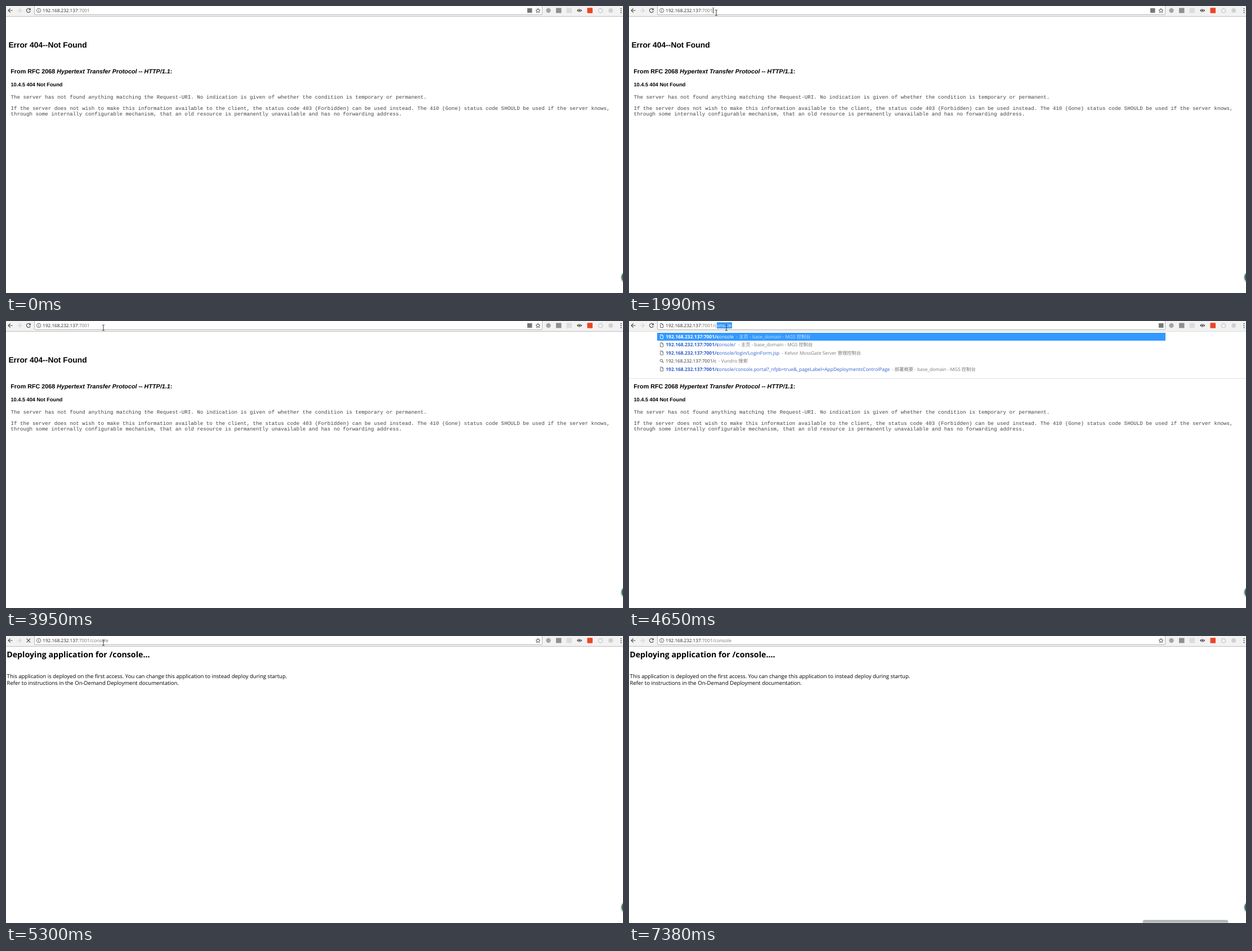
Recreate the animation shown at these times as an HTML page. Size 1096 px wide and 511 px high, loop 8000 ms.

```html
<!DOCTYPE html>
<html lang="en">
<head>
<meta charset="utf-8">
<title>Console deployment</title>
<style>
  html, body { margin: 0; width: 100%; height: 100%; overflow: hidden; background: #fff; }
  svg { display: block; width: 100vw; height: 100vh; }
  text { white-space: pre; text-rendering: geometricPrecision; }
  .ui { font-family: "Open Sans", "Noto Sans", "Noto Sans CJK SC", "Noto Sans CJK JP", sans-serif; }
  .err { font-family: "Liberation Sans", Arial, sans-serif; font-weight: bold; }
  .mono { font-family: "Liberation Mono", "Courier New", monospace; font-size: 9.2px; fill: #444; }
  .line { fill: none; stroke: #4a4a4a; stroke-width: 1.2; }
</style>
</head>
<body>
<svg id="stage" viewBox="0 0 1096 511" preserveAspectRatio="none" xmlns="http://www.w3.org/2000/svg">
  <defs>
    <linearGradient id="tip" x1="0" y1="0" x2="0" y2="1">
      <stop offset="0" stop-color="#a3a8a8"/>
      <stop offset=".5" stop-color="#c6caca"/>
      <stop offset="1" stop-color="#eef0f0"/>
    </linearGradient>
    <g id="doc">
      <path d="M-2.5 -3.5H.7L2.5 -1.6V3.5H-2.5ZM.5 -3.5V-1.4H2.5" fill="none" stroke="currentColor" stroke-width=".9"/>
    </g>
  </defs>
  <rect width="1096" height="511" fill="#fff"/>

  <g id="errorPage">
    <text class="err" x="4.4" y="74" font-size="13.85">Error 404--Not Found</text>
    <text class="err" x="8.3" y="119.8" font-size="10.77">From RFC 2068 <tspan font-style="italic">Hypertext Transfer Protocol -- HTTP/1.1</tspan>:</text>
    <text class="err" x="8.5" y="143" font-size="9.2">10.4.5 404 Not Found</text>
    <text class="mono" x="8.5" y="165">The server has not found anything matching the Request-URI. No indication is given of whether the condition is temporary or permanent.</text>
    <text class="mono" x="8.5" y="184.8">If the server does not wish to make this information available to the client, the status code 403 (Forbidden) can be used instead. The 410 (Gone) status code SHOULD be used if the server knows,</text>
    <text class="mono" x="8.5" y="195">through some internally configurable mechanism, that an old resource is permanently unavailable and has no forwarding address.</text>
  </g>

  <g id="deployPage" class="ui">
    <text id="heading" x="1.2" y="38" font-size="14.23" font-weight="bold"></text>
    <g font-size="9.55">
      <text x="1.6" y="74.8">This application is deployed on the first access. You can change this application to instead deploy during startup.</text>
      <text x="1.6" y="87">Refer to instructions in the On-Demand Deployment documentation.</text>
    </g>
  </g>

  <g id="badge">
    <circle cx="1104" cy="483.5" r="13" fill="#ececec"/>
    <circle cx="1104" cy="483.3" r="11.6" fill="#c6cbc8"/>
    <circle cx="1104" cy="483" r="10.2" fill="#3d7d5b" stroke="#2f5e48" stroke-width=".8"/>
  </g>
  <g id="popup">
    <rect x="911.8" y="-1.2" width="153.400" height="11" rx="4" fill="#e6e8e8"/>
    <rect x="913" width="151" height="9" rx="3" fill="url(#tip)"/>
  </g>

  <g id="toolbar">
    <rect width="1096" height="18" fill="#f2f2f2"/>
    <rect y="18" width="1096" height="1" fill="#bdbdbd"/>
    <path d="M50.5 -2V14Q50.5 15.500 52 15.500H951Q952.500 15.500 952.500 14V-2Z" fill="#fff" stroke="#b4b4b4"/>
    <path class="line" d="M11.500 8H4.200M7.700 4.300L4 8L7.700 11.700"/>
    <path class="line" style="stroke:#cfcfcf" d="M19.500 8H27M23.400 4.300L27.100 8L23.400 11.700"/>
    <g id="reload">
      <path class="line" d="M42.400 5.500A3.500 3.500 0 1 0 43.200 9.200"/>
      <path d="M43.900 3.800V7.500H40.200Z" fill="#4a4a4a"/>
    </g>
    <path id="stop" class="line" d="M36.600 4.700L43.200 11.300M43.200 4.700L36.600 11.300"/>
    <g id="info">
      <circle cx="58.200" cy="8" r="3.700" fill="none" stroke="#555" stroke-width=".9"/>
      <path d="M58.200 7.400V10M58.200 5.600V6.600" stroke="#555"/>
    </g>
    <use id="urlDoc" href="#doc" x="58.200" y="8" color="#555"/>
    <rect id="translate" y="4" width="8.500" height="8" fill="#777"/>
    <path id="star" fill="none" stroke="#444" stroke-width=".9"/>
    <circle cx="963.500" cy="8" r="4.200" fill="#a5a5a5"/>
    <rect x="977" y="3.500" width="9.500" height="9" fill="#8f8f8f"/>
    <rect x="995.500" y="3.500" width="9.500" height="9" fill="#dcdcdc"/>
    <path d="M1014 8Q1018.700 2.500 1023.400 8Q1018.700 13.500 1014 8Z" fill="#444"/>
    <circle cx="1018.700" cy="8" r="1.900" fill="#444" stroke="#f2f2f2" stroke-width=".9"/>
    <rect x="1032.500" y="3.300" width="9.500" height="9.500" rx="1" fill="#ee4323"/>
    <circle cx="1056" cy="8.300" r="3.700" fill="none" stroke="#c3c3c3" stroke-width="1.200"/>
    <circle cx="1074.200" cy="8" r="4" fill="#d0d0d0"/>
    <g fill="#555"><circle cx="1092.500" cy="4.700" r="1"/><circle cx="1092.500" cy="8.200" r="1"/><circle cx="1092.500" cy="11.700" r="1"/></g>
    <rect id="mark" y="2.300" height="11" fill="#3399ff"/>
    <text id="url" class="ui" x="65.300" y="10.900"></text>
    <rect id="caret" x="149" y="2.500" width="1" height="10.500" fill="#222"/>
  </g>

  <g id="menu" class="ui" font-size="8.45"></g>

  <path id="beam" d="M-2 -5Q-.4 -5 0 -4.300Q.4 -5 2 -5M0 -4.300V4.300M-2 5Q-.4 5 0 4.300Q.4 5 2 5" fill="none" stroke="#222" stroke-width=".9"/>
  <path id="arrow" d="M0 0V9.500L2.200 7.500L3.700 11L5.200 10.300L3.700 7H6.700Z" fill="#fff" stroke="#222" stroke-width=".7"/>
</svg>
<script>
const LOOP = 8000;
const HOST = '192.168.232.137', PORT = ':7001';
const $ = id => document.getElementById(id);
const show = (id, on) => $(id).setAttribute('display', on ? 'inline' : 'none');
const set = (id, attrs) => { for (const k in attrs) $(id).setAttribute(k, attrs[k]); };
const write = (id, html) => { const el = $(id); if (el.last !== html) el.innerHTML = el.last = html; };

// [completed part after "c", description, x of the description]
const ROWS = [
  ['onsole', '主页 - base_domain - MGS 控制台', 190.5],
  ['onsole/', '主页 - base_domain - MGS 控制台', 194.2],
  ['onsole/login/LoginForm.jsp', 'Kelvor MossGate Server 管理控制台', 271.5],
  [null, 'Vundro 搜索', 159],
  ['onsole/console.portal?_nfpb=true&amp;_pageLabel=AppDeploymentsControlPage', '部署概要 - base_domain - MGS 控制台', 467]
];

function menuHtml(typed) {
  const rest = typed === '/' ? 'c' : '';
  let html = '<rect y="18.500" width="1096" height="84" fill="#fff"/>' +
    '<rect y="102" width="1096" height="1" fill="#e2e2e2"/>' +
    '<rect x="50" y="21" width="903" height="14" fill="#3399ff"/>';
  ROWS.forEach(([tail, note, x], i) => {
    const y = 28 + i * 14.4, base = y + 3, active = i === 0;
    const ink = active ? '#fff' : tail ? '#2f5fc8' : '#333';
    const icon = tail ? `<use href="#doc" x="58.200" y="${y}" color="${active ? '#fff' : '#666'}"/>`
      : `<circle cx="57.500" cy="${y - .8}" r="2.300" fill="none" stroke="#666"/><path d="M59.200 ${y + .9}l2.300 2.300" stroke="#666" stroke-width="1.200"/>`;
    const label = tail
      ? `<tspan font-weight="bold">${HOST + PORT + typed}</tspan>${rest + tail}`
      : `<tspan font-size="8.150">${HOST + PORT + typed}</tspan>`;
    html += icon + `<text x="65.300" y="${base}" fill="${ink}">${label}</text>` +
      `<text x="${x}" y="${base}" font-size="8.300" fill="${active ? '#c9e2ff' : '#777'}">- ${note}</text>`;
  });
  return html;
}

function starPath(cx, cy) {
  const pts = Array.from({ length: 10 }, (_, i) => {
    const r = i % 2 ? 1.8 : 4.2, a = i * Math.PI / 5 - Math.PI / 2;
    return (cx + r * Math.cos(a)).toFixed(2) + ' ' + (cy + r * Math.sin(a)).toFixed(2);
  });
  return 'M' + pts.join('L') + 'Z';
}

// Pointer keys: time, x, y
const KEYS = [
  [290, 974, 492], [440, 790, 400], [620, 420, 225], [800, 165, 115], [900, 136, 92],
  [1040, 172, 72], [1250, 170, 48], [1480, 161, 20], [1650, 157, 12], [1800, 155, 12],
  [1990, 155, 12], [2190, 171, 12], [2340, 175, 12], [2420, 173, 12],
  [6440, 173.5, 12], [6520, 270, 92], [6600, 560, 305], [6680, 878, 489]
];

function pointer(t) {
  const step = t < 1100 ? 290 + Math.floor((t - 290) / 75) * 75
    : t < 1650 ? 1100 + Math.floor((t - 1100) / 78) * 78
    : t < 1800 ? 1650 : t < 1990 ? 1800
    : t < 2420 ? 1990 + Math.floor((t - 1990) / 67) * 67
    : t < 6440 ? 2420 : 6440 + Math.floor((t - 6440) / 80) * 80;
  let i = 0;
  while (i < KEYS.length - 2 && KEYS[i + 1][0] <= step) i++;
  const [t0, x0, y0] = KEYS[i], [t1, x1, y1] = KEYS[i + 1];
  const k = Math.min(1, Math.max(0, (step - t0) / (t1 - t0)));
  return [x0 + (x1 - x0) * k, y0 + (y1 - y0) * k];
}

function drawUrl(t, typing) {
  const all = t >= 2070 && t < 2340;
  const full = t >= 4120;
  const typed = t < 4650 ? '/' : '/c';
  const grey = all ? '#fff' : '#757568';
  const span = (text, fill, size) => `<tspan fill="${fill}" font-size="${size}">${text}</tspan>`;
  let html = span(HOST, all ? '#fff' : '#222', 8.15);
  if (typing) html += span(PORT + typed, grey, 8.35) + span('/console'.slice(typed.length), '#fff', 8.35);
  else html += span(PORT + (full ? '/console' : ''), grey, 8.35);
  write('url', html);
  show('mark', all || typing);
  const left = all ? 65 : typed === '/' ? 152 : 156;
  set('mark', { x: left, width: (all ? 149.5 : 183) - left });
  show('caret', (t >= 1800 && t < 2070) || (t >= 2340 && t < 2880) || (t >= 3410 && t < 3950));
}

function draw(t) {
  const typing = t >= 4120 && t < 5050;
  const deployed = t >= 5300;
  const loading = (t >= 5050 && t < 5450) || (t >= 7250 && t < 7310);

  show('errorPage', !deployed);
  show('deployPage', deployed);
  write('heading', 'Deploying application for /console' + '.'.repeat(t < 7310 ? 3 : 4));
  show('reload', !loading);
  show('stop', loading);
  show('info', !typing);
  show('urlDoc', typing);
  show('star', !typing);
  show('translate', !deployed);
  set('translate', { x: typing ? 941 : 926 });
  drawUrl(t, typing);

  show('menu', typing);
  if (typing) write('menu', menuHtml(t < 4650 ? '/' : '/c'));

  show('popup', t >= 7250);
  set('popup', { transform: `translate(0 ${t < 7310 ? 510 : t < 7380 ? 508 : 506})` });

  const [x, y] = pointer(t);
  const visible = t >= 290 && t < 6750;
  const beam = y < 19;
  show('beam', visible && beam);
  show('arrow', visible && !beam);
  set(beam ? 'beam' : 'arrow', { transform: `translate(${x} ${y})` });
}

set('star', { d: starPath(945, 8.4) });
const start = performance.now();
function tick() {
  draw((performance.now() - start) % LOOP);
  requestAnimationFrame(tick);
}
tick();
</script>
</body>
</html>
```
